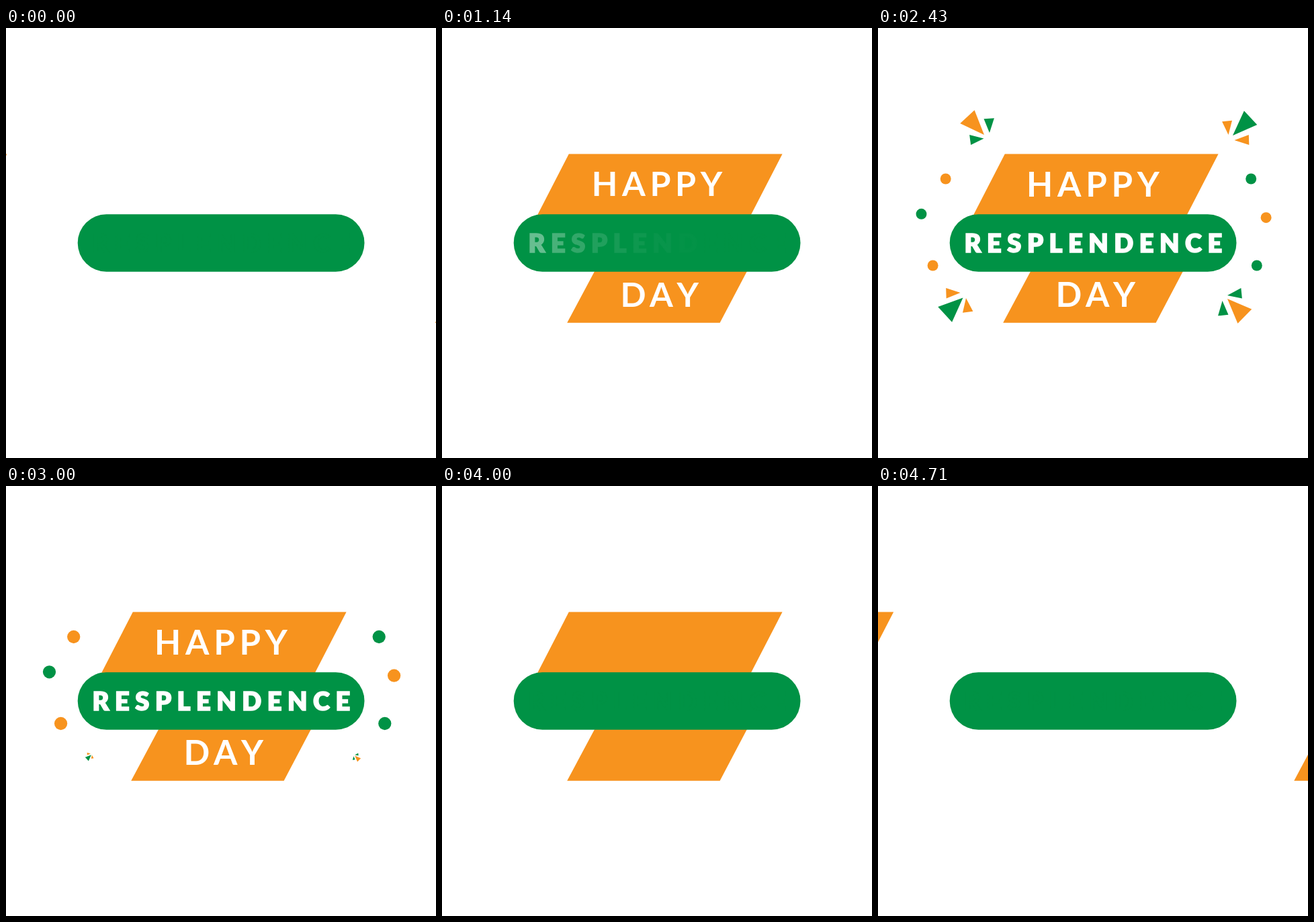
Recreate the animation shown at these times as an HTML page. Size 640 by 640 pixels, loop 4780 ms.

```html
<!DOCTYPE html>
<html lang="en">
<head>
<meta charset="utf-8">
<title>Happy Resplendence Day</title>
<style>
  html, body { margin: 0; width: 100%; height: 100%; overflow: hidden; background: #fff; }
  svg { display: block; width: 100%; height: 100%; }
  text { font-family: Lato, "Open Sans", sans-serif; text-anchor: middle; font-kerning: none; }
  .line { font-size: 51px; font-weight: 700; fill: #fff; }
  #word { font-size: 38px; font-weight: 900; letter-spacing: 8.5px; stroke-width: 1.6px; }
</style>
</head>
<body>
<svg viewBox="0 0 640 640">
  <rect width="640" height="640" fill="#fff"/>
  <path id="top" fill="#f7931e" d="M188.8 187.6H506.6L459.9 278H142.2Z"/>
  <path id="bottom" fill="#f7931e" d="M227.2 362H454L413.6 438.7H186.2Z"/>
  <rect x="106.7" y="277.2" width="426.8" height="85.6" rx="42.8" fill="#009245"/>
  <g id="happy"><text class="line" x="3.3" y="18.6" letter-spacing="6.7">HAPPY</text></g>
  <g id="day"><text class="line" x="6.6" y="17" letter-spacing="5.7">DAY</text></g>
  <text id="word" x="324.7" y="334.2"></text>
  <g id="confetti"></g>
</svg>
<script>
const NS = "http://www.w3.org/2000/svg";
const ORANGE = "#f7931e", GREEN = "#009245";
const LOOP = 4780, STEP = LOOP / 67;
const $ = id => document.getElementById(id);

function add(parent, tag, attrs) {
  const el = document.createElementNS(NS, tag);
  for (const key in attrs) el.setAttribute(key, attrs[key]);
  return parent.appendChild(el);
}

// Sine ease from 0 to 1 between two times.
function ease(t, from, to) {
  const p = Math.min(1, Math.max(0, (t - from) / (to - from)));
  return (1 - Math.cos(Math.PI * p)) / 2;
}
const pulse = (t, a, b, c, d) => ease(t, a, b) - ease(t, c, d);

function place(el, x, y, scale) {
  el.setAttribute("visibility", scale > 0.002 ? "visible" : "hidden");
  el.setAttribute("transform", `translate(${x} ${y}) scale(${scale})`);
}

const letters = [..."RESPLENDENCE"].map(ch => {
  const el = add($("word"), "tspan", {});
  el.textContent = ch;
  return el;
});

const dots = [
  [100.7, 224.5, ORANGE], [64.5, 276.8, GREEN], [81.6, 353.5, ORANGE],
  [555.2, 224.5, GREEN], [577.6, 282.2, ORANGE], [563.8, 353.5, GREEN]
].map(([cx, cy, fill]) => add($("confetti"), "circle", { cx, cy, fill, r: 0 }));

// Each burst: origin, main colour, side colour, then one large and two small triangles.
const bursts = [
  [160, 160, ORANGE, GREEN, "122,142 143.5,122 158,159", "157.5,135 173,134 166,156", "136,159 157.5,164.5 138,174"],
  [526, 161, GREEN, ORANGE, "545,123 564.5,144 528,160", "512,139 527,137.5 521.5,159", "530.5,167 552,159 552.5,174"],
  [127, 400, GREEN, ORANGE, "89,415 126.5,401.5 110,438", "101,387 122.5,394 101.5,402.5", "131,402 141.5,422 126,424"],
  [519, 401, ORANGE, GREEN, "520,403 556.5,418.5 535.5,440", "540.5,387 542,402.5 520,398", "512.5,406 521.5,427 506,428.5"]
].map(([x, y, main, side, ...tris]) => {
  const g = add($("confetti"), "g", {});
  tris.forEach((points, i) => add(g, "polygon", {
    points, fill: i ? side : main, transform: `translate(${-x} ${-y})`
  }));
  return { x, y, g, upper: y < 300 };
});

// White over the green band at the given opacity.
function tint(a) {
  const mix = c => Math.round(c + (255 - c) * a);
  return `rgb(${mix(0)},${mix(146)},${mix(69)})`;
}

function draw(t) {
  const away = 1 - pulse(t, -20, 570, 4191, 4791);
  $("top").setAttribute("transform", `translate(${-506.6 * away} 0)`);
  $("bottom").setAttribute("transform", `translate(${453.8 * away} 0)`);

  const size = pulse(t, 605, 1190, 3008, 3593);
  place($("happy"), 320, 232, size);
  place($("day"), 320, 398, size);

  const front = t < 2400 ? 0.021 * (t - 1140) - 2.65 : 2.34 - 0.024 * (t - 3430);
  letters.forEach((el, i) => {
    const a = 1.03 * Math.exp(-0.33 * (i - front)) - 0.03;
    const color = tint(Math.min(1, Math.max(0, a)));
    el.setAttribute("fill", color);
    el.setAttribute("stroke", color);
  });

  const r = 9.8 * pulse(t, 1781, 2681, 2947, 3547);
  dots.forEach(dot => dot.setAttribute("r", r));

  bursts.forEach(({ x, y, g, upper }) => {
    const out = upper ? [2440, 2930] : [2620, 3180];
    place(g, x, y, pulse(t, 2065, 2445, ...out));
  });
}

const begin = performance.now();
function tick() {
  const t = (performance.now() - begin) % LOOP;
  draw(Math.floor(t / STEP + 0.06) % 67 * STEP);
  requestAnimationFrame(tick);
}
tick();
</script>
</body>
</html>
```
